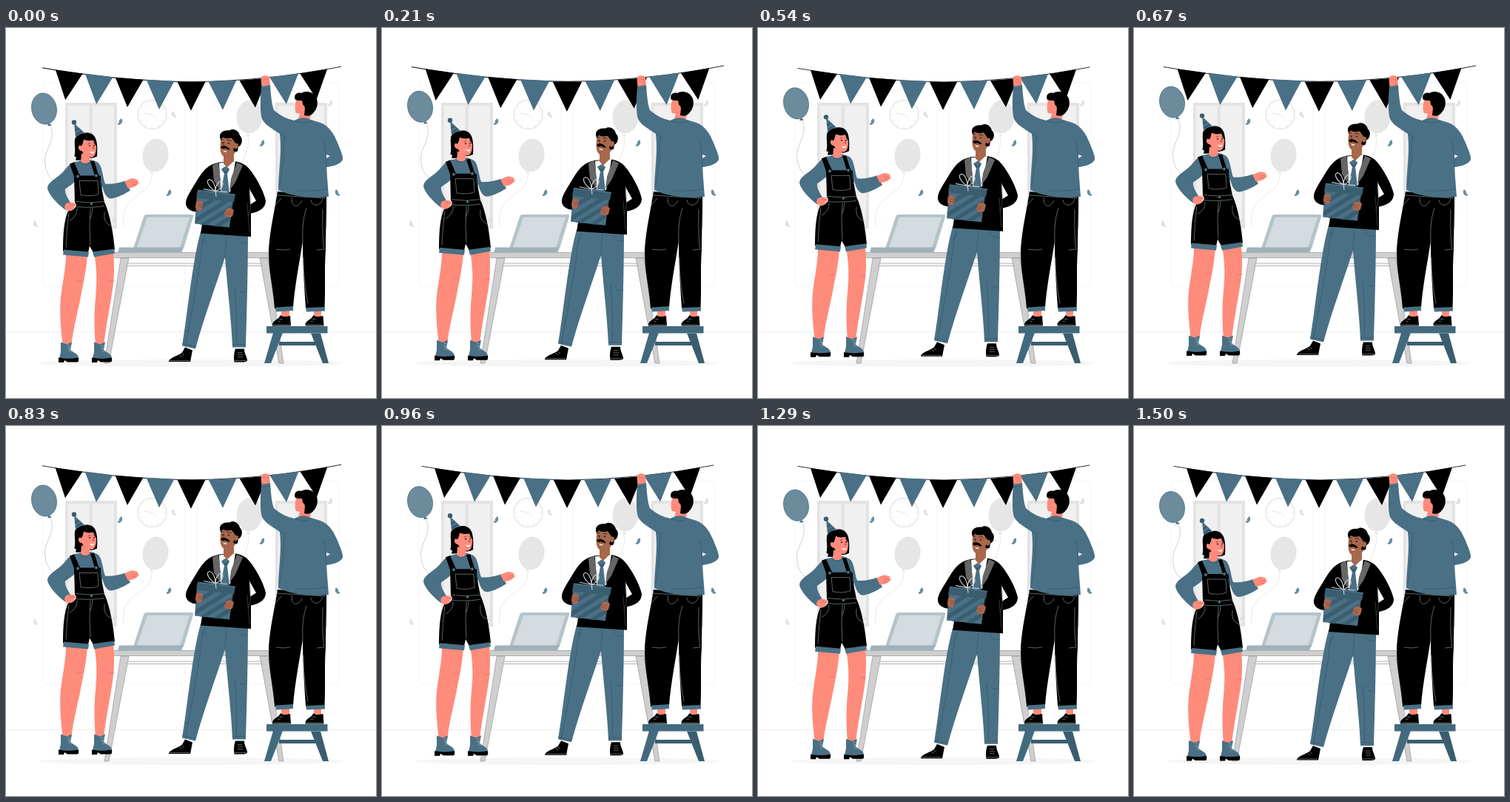
Animation, 500 px wide and 500 px high, one loop 1.54 s. Source, as an HTML page:

```html
<!DOCTYPE html>
<html lang="en">
<head>
<meta charset="utf-8">
<title>Office party</title>
<style>
  html, body { margin: 0; height: 100%; overflow: hidden; background: #fff; }
  svg { display: block; width: 100%; height: 100%; }
  .blue { fill: #4a7085; }
  .deep { fill: #3a5d70; }
  .pink { fill: #ff8b7b; }
  .tan { fill: #a9674c; }
  .pale { fill: #e6e6e6; }
  .white { fill: #fff; }
  .line { fill: none; stroke: #263238; stroke-width: .6; stroke-linecap: round; }
  .seam { fill: none; stroke: #cfd8dc; stroke-width: .45; }
  .fold { fill: none; stroke: #2f5163; stroke-width: .6; }
  .faint { fill: none; stroke: #e3e3e3; stroke-width: .8; }
  .crease { fill: none; stroke: #d9695d; stroke-width: .6; stroke-linecap: round; }
</style>
</head>
<body>
<svg viewBox="0 0 500 500">
  <defs>
    <g id="window">
      <path fill="#e3e3e3" d="M80 101h70v170h-70z"/>
      <path fill="#f0f0f0" d="M83.500 105h29v162h-29zM117 105h29v162h-29z"/>
    </g>
    <path id="curl" d="M2-5C4-2 4 3-2 4C-4 3-3 1-1 1C-2-2 0-3 2-5Z"/>
    <g id="boot">
      <path class="blue" d="M74 425L82 428L89 425L87 435C91 440 98 440 98 447H72L74 438Z"/>
      <path d="M71 446Q85 448 98 446Q99 452 96 452H83L79 449.500L78 452.500H71Z"/>
      <path class="seam" d="M83 429l4 1M83 432l4 1M84 435l4 0M85 438l4-1"/>
    </g>
    <g id="shoe">
      <path d="M371 388C374 391 379 390 384 389L385 402.500H360C359 395 368 395 371 388Z"/>
      <path class="seam" d="M360 401H384M369 393l5 1M367 396l4 1"/>
    </g>
  </defs>

  <!-- room -->
  <g fill="none" stroke="#f5f5f5">
    <rect x="50" y="74" width="192" height="275" rx="5"/>
    <rect x="258" y="74" width="192" height="275" rx="5"/>
    <path stroke="#eee" d="M0 410.500H500"/>
  </g>
  <use href="#window"/>
  <use href="#window" x="284"/>
  <circle cx="197.500" cy="117" r="19.500" fill="#fff" stroke="#e6e6e6" stroke-width="1.500"/>
  <circle cx="197.500" cy="117" r="16" fill="none" stroke="#ddd" stroke-width="2.500" stroke-dasharray=".7 7.678"/>
  <path class="faint" d="M186 115L197.500 117L204 123"/>
  <g class="pale">
    <ellipse cx="202" cy="172" rx="17.500" ry="22.500" transform="rotate(9 202 172)"/>
    <path d="M197 193l-3 3h5z"/>
    <ellipse cx="329" cy="120" rx="17.500" ry="22.500" transform="rotate(4 329 120)"/>
    <path d="M327 142l-2 4h5z"/>
  </g>
  <path class="faint" d="M197 196C199 215 180 224 169 233C160 242 158 251 159 267M327 146C330 164 321 173 318 187"/>
  <g fill="#6c8c9d">
    <use href="#curl" x="154" y="127"/>
    <use href="#curl" x="346" y="156"/>
    <use href="#curl" x="220" y="223"/>
    <use href="#curl" transform="translate(448 223) scale(-1 1)"/>
  </g>
  <g fill="#dbe2e5">
    <use href="#curl" x="438" y="102"/>
    <use href="#curl" x="146" y="259"/>
    <use href="#curl" transform="translate(227 117) scale(-1 1)"/>
    <use href="#curl" transform="translate(40 265) scale(-1 1)"/>
  </g>
  <ellipse cx="250" cy="453" rx="206" ry="5" fill="#f5f5f5"/>

  <!-- table and laptop -->
  <g fill="#cfcfcf" stroke="#777" stroke-width=".5">
    <path d="M155 311H166L139 453H133ZM343 311H354L375 453H369Z"/>
    <path fill="#f4f4f4" d="M164 318H345V321.500H163Z"/>
    <path d="M141 303.500H354V310.500H141Z"/>
  </g>
  <path fill="#b5c3ca" d="M190 252H251Q254 252 253 255L240 298H172L186 255Q187 252 190 252Z"/>
  <path fill="#d4dce1" d="M191 256H248L235 296.500H177Z"/>
  <path fill="#9fb1bb" d="M153 296.500H240L237 303.500H151Z"/>

  <!-- bunting -->
  <g id="bunting">
    <path class="line" style="stroke-width:1" d="M54 54.500Q152 72 251 73Q350 72 448 53"/>
    <path d="M71 57L107 62L84 97ZM150 67L187 70L166 106.500ZM232 73H269L250 111ZM314 71L351 68L335 107ZM394 62L430 56L416 96Z"/>
    <path class="blue" d="M110 62L147 66.500L125 102.500ZM191 70L228 72L208 109.500ZM273 72.500L310 71L292 110ZM354 67L392 62L376 102.500Z"/>
  </g>

  <!-- man on the stool -->
  <g>
    <path class="deep" d="M369 424H418V429H369ZM412 412.500H425L436 453H428Z"/>
    <path fill="#426a7e" d="M361 412H374L358 453H349ZM352 403H434.500V412.500H352Z"/>
    <path class="pink" d="M372 381H383V391H372ZM416 381H426V391H416Z"/>
    <use href="#shoe"/>
    <use href="#shoe" x="44.500"/>
    <path d="M367 221L433 227C433 255 432 280 432 300C430 325 432 350 430.500 378H405C403 348 401 320 401 288C396 320 390 350 388 378L363 379C361 350 354 325 355 299C357 270 363 247 367 221Z"/>
    <path class="blue" d="M364 377.500L388 376V382L365 383.500ZM405 378L431 377V382.500L406 383.500Z"/>
    <path class="seam" d="M366 226L432 230M401 290C400 268 402 256 406 243M386 229C386 245 396 242 400 233M412 232C414 242 424 242 428 231M363 240L372 230M365 299Q375 301 384 299M402 310Q402 345 408 372M428 245Q427 285 430 299L420 300"/>
    <path class="pink" d="M393 95C390 103 390 111 392 115L397 116L395 123Q403 129 411 123L413 107L405 94Z"/>
    <path d="M391 97C388 91 393 86 399 88C404 84 415 86 418 92C423 98 421 109 416 114C413 118 409 120 403 118L404 109C401 106 401 102 400 98C397 98 394 98 391 97Z"/>
    <path class="pink" d="M404 108C402 101 396 102 397 108C398 112 403 113 404 108Z"/>
    <path class="pink" d="M345 67C345 64 355 63 356 67L357 80L346 81Q344 72 345 67Z"/>
    <path class="crease" d="M347 70q4-1 8 0M354 72l1 5"/>
    <path class="blue" d="M345 79L357 77C358 91 359 103 362 111C370 118 379 123 390 125Q402 118 412 124L425 128C437 132 444 145 448 155C452 165 456 174 455 178C452 184 442 187 433 188L436 228C410 231 385 227 368 219C368 194 373 168 370 143C360 136 346 129 345 119C343 106 344 92 345 79Z"/>
    <path class="white" d="M433 171L438 173L433 176Z"/>
    <path class="fold" d="M390 125Q402 131 413 126M370 143L379 147M376 147C375 170 374 190 370 213M433 188C433 172 431 162 429 154M393 220Q415 221 435 218M346 83L357 81"/>
  </g>

  <g id="floaters">
    <!-- blue balloon -->
    <path class="faint" style="stroke:#bcc6cb" d="M59 130C70 153 49 165 53 185C54 200 62 203 66 210"/>
    <ellipse cx="51.500" cy="109.500" rx="16.800" ry="21.200" transform="rotate(-12 51.500 109.500)" fill="#6c8c9d" stroke="#4a7085" stroke-width=".8"/>
    <path class="blue" d="M58 129L56 133L62 132Z"/>

    <!-- woman -->
    <path class="pink" d="M81 305H110C109 325 105 343 102 358C98 381 91 405 88 431H77C74 407 72 385 74 365C77 340 81 325 81 305ZM119 305H145C147 325 146 343 143 360C139 385 134 410 132 431H121C119 405 119 385 121 365C123 345 123 325 119 305Z"/>
    <path class="crease" d="M96 341q4 2 7 0M139 342q3 2 7 0"/>
    <use href="#boot"/>
    <use href="#boot" x="45"/>
    <path d="M93 151C95 143 108 140 115 143C123 147 124 158 123 174Q115 178 111 175Q103 180 94 179L95 175Q91 174 93 171C94 164 92 157 93 151Z"/>
    <path class="blue" d="M97 181C88 181 84 187 77 195C70 203 57 208 56 216C56 224 70 239 80 246L88 238C83 230 79 223 80 218C85 215 90 211 93 208V222H128L130 214Q134 231 142 231C150 230 160 225 168 220L161 207C152 210 143 212 134 211C130 199 130 184 122 181Q109 175 97 181Z"/>
    <path class="pink" d="M102 170L113 171V181Q107 186 101 181Z"/>
    <path class="pink" d="M104 151L121 152C123 164 122 173 117 175C111 176 105 173 103 167C97 167 96 158 102 158Z"/>
    <path d="M97 158C96 147 104 142 112 143C120 145 123 152 122 160Q119 156 118 152Q110 154 105 151Q104 157 102 160Z"/>
    <path class="line" d="M111 157l3-1M118 156l2 1M118 159l1 4-2 0"/>
    <circle cx="113" cy="159.500" r=".9"/><circle cx="119.500" cy="159" r=".8"/>
    <path class="white" d="M112 167Q116 169 119.500 167Q118 173 112 167Z"/>
    <path class="blue" d="M92 129L94 148Q99 143 107 143Z"/>
    <path class="fold" style="stroke-width:1.500" d="M93 139L98 136M94 145L102 140"/>
    <circle class="deep" cx="92" cy="128" r="3.200"/>
    <path class="pink" d="M80 239C85 234 93 236 95 240Q92 241 91 245C86 250 81 248 79 243Z"/>
    <path class="pink" d="M160 208C165 206 168 203 173 204L179 206Q176 208 180 209C178 214 170 217 164 217Z"/>
    <path d="M86 184L92 182L100 200H120L114 181L119 180L125 199L128 201C128 213 131 225 133 236C140 250 145 277 147 300L118 304L113 295L111 304L77 302C77 275 79 259 84 248C90 248 95 243 95 239L93 236L92 201Z"/>
    <path class="blue" d="M78 300L112 303L111 310L77 307ZM117 303L146 299L147 305L119 310Z"/>
    <g class="blue"><circle cx="97" cy="201" r="2"/><circle cx="122" cy="200" r="2"/><circle cx="115.500" cy="238" r="1.700"/></g>
    <path class="seam" d="M99 207H124L125 225Q114 229 101 226ZM94 235Q114 238 132 235M93 242Q115 244 133 241M114 244Q112 270 114 294M113 258Q116 257 117 243M85 250Q82 273 81 297M133 249Q131 264 142 268M96 244Q97 254 86 261"/>
    <path class="fold" d="M76 219Q80 215 83 212M128 213Q127 205 125 202M160 209Q163 214 165 219M101 182Q107 188 114 182"/>
    <path class="crease" d="M171 209l6 0M170 212l6 0M86 239l6 1"/>

    <!-- man with the gift -->
    <path d="M242 432L252 436L249 451.500H220C220 446 232 444 238 439ZM310 434H322C322 441 326 445 326 450Q325 452 318 452H308.500Q307 442 310 434Z"/>
    <path class="seam" d="M221 450H248M237 440l4 3M234 442l4 3M313 439l6 0M313 442l7 0M313 445l7 0M309 450H325"/>
    <path class="blue" d="M263 276L327 280C327 315 326 370 324 432H306C305 400 299 350 296 310C285 345 268 390 256 434L238 430C245 388 252 315 263 276Z"/>
    <path class="fold" d="M296 312Q296 300 298 282M266 285Q260 340 246 410L242 430M238 427L257 431M306 428H324M313 282Q314 292 326 291M268 281Q270 290 264 292M316 357l8 1M309 350Q313 395 311 427"/>
    <path d="M288 182C272 185 266 194 259 205C251 219 242 230 243 239C245 248 257 251 268 248L263 278L331 282.500V251C343 249 351 243 351 234C348 219 334 195 325 187Q318 182 311 181Z"/>
    <path class="white" d="M329 218L338 234L330 239ZM288 183L310 181L303 222H290Z"/>
    <path class="blue" d="M291 191L297 187L302 191L299 197L302 224H290L295 197Z"/>
    <path class="deep" d="M291 191L297 194L302 191L299 197H295Z"/>
    <path fill="#666" d="M279 186L287 182L290 206L289 219L281 207ZM312 182L320 186L310 209L302 220L304 204Z"/>
    <path class="seam" style="stroke:#777" d="M329 216Q333 243 327 255M326 237L329 277"/>
    <path class="tan" d="M294 170L308 165L308 180L299 189L294 184Z"/>
    <path class="tan" d="M291 147L311 148C313 158 312 167 308 171C305 176 298 177 294 174C288 170 289 158 291 147Z"/>
    <path d="M289 148C288 141 296 138 302 139C308 135 315 140 316 146C321 150 319 159 314 161L313 167Q309 169 307 166L310 156L305 149Q297 151 293 148L290 152Z"/>
    <path class="tan" d="M308 162C306 156 314 154 314 159C314 163 310 166 308 162Z"/>
    <path d="M290 162C292 158 299 159 303 165Q299 165 296 163Q293 165 290 162Z"/>
    <path class="white" d="M293 166Q296 167 299 167Q296 170 293 166Z"/>
    <path class="line" style="stroke-width:1" d="M291 152l3-1M299 152q3-1 5 1"/>
    <circle cx="293" cy="155.500" r=".9"/><circle cx="301" cy="156" r=".9"/>
    <path class="line" d="M295 155l-2 4 2 0"/>
    <path class="blue" d="M258 228L307 234L302 270L255 265Z"/>
    <path class="deep" d="M259 219L310 225L308 236L257 230ZM257 243L275 232L284 233L257 249ZM256 257L293 234L302 235L256 264ZM262 266L306 239L305 246L270 267ZM280 268L304 253L303 260L289 269Z"/>
    <path class="fold" style="stroke:#6c8c9d" d="M259 220L310 226"/>
    <path fill="none" stroke="#c4ced3" stroke-width="1.200" d="M283 221C274 216 269 206 275 205C281 206 283 216 283 221C283 213 288 206 292 208C296 213 289 219 283 221L267 218M283 221L299 222M283 221L284 228"/>
    <path class="tan" d="M257 235C262 232 267 235 266 240L264 246C261 250 256 246 256 242ZM297 246C301 242 306 244 308 247L306 255C301 258 295 256 295 252Z"/>
    <path class="line" style="stroke:#7d4632" d="M260 239l5 0M260 242l5 0M297 249l5 0M297 252l5 0"/>
  </g>
</svg>
<script>
  const LOOP = 1540, CYCLE = 1500, LEAD = 33;
  const FLOAT = [[0, 0], [.5, -10], [1, 0]];
  const BEAT = [[0, 1], [.1, 1.1], [.3, 1], [.4, 1], [.5, 1.1], [.6, 1], [1, 1]];
  const floaters = document.getElementById('floaters');
  const bunting = document.getElementById('bunting');

  // Linear interpolation between [position, value] keys.
  function sample(keys, p) {
    const i = Math.max(1, keys.findIndex(([pos]) => pos >= p));
    const [p0, v0] = keys[i - 1], [p1, v1] = keys[i];
    return v0 + (v1 - v0) * (p - p0) / (p1 - p0);
  }

  function draw(now) {
    const p = Math.min(1, (now % LOOP + LEAD) / CYCLE);
    floaters.setAttribute('transform', `translate(0 ${sample(FLOAT, p)})`);
    bunting.setAttribute('transform',
      `translate(251 82) scale(${sample(BEAT, p)}) translate(-251 -82)`);
  }

  const start = performance.now();
  function tick() {
    draw(performance.now() - start);
    requestAnimationFrame(tick);
  }
  tick();
</script>
</body>
</html>
```
